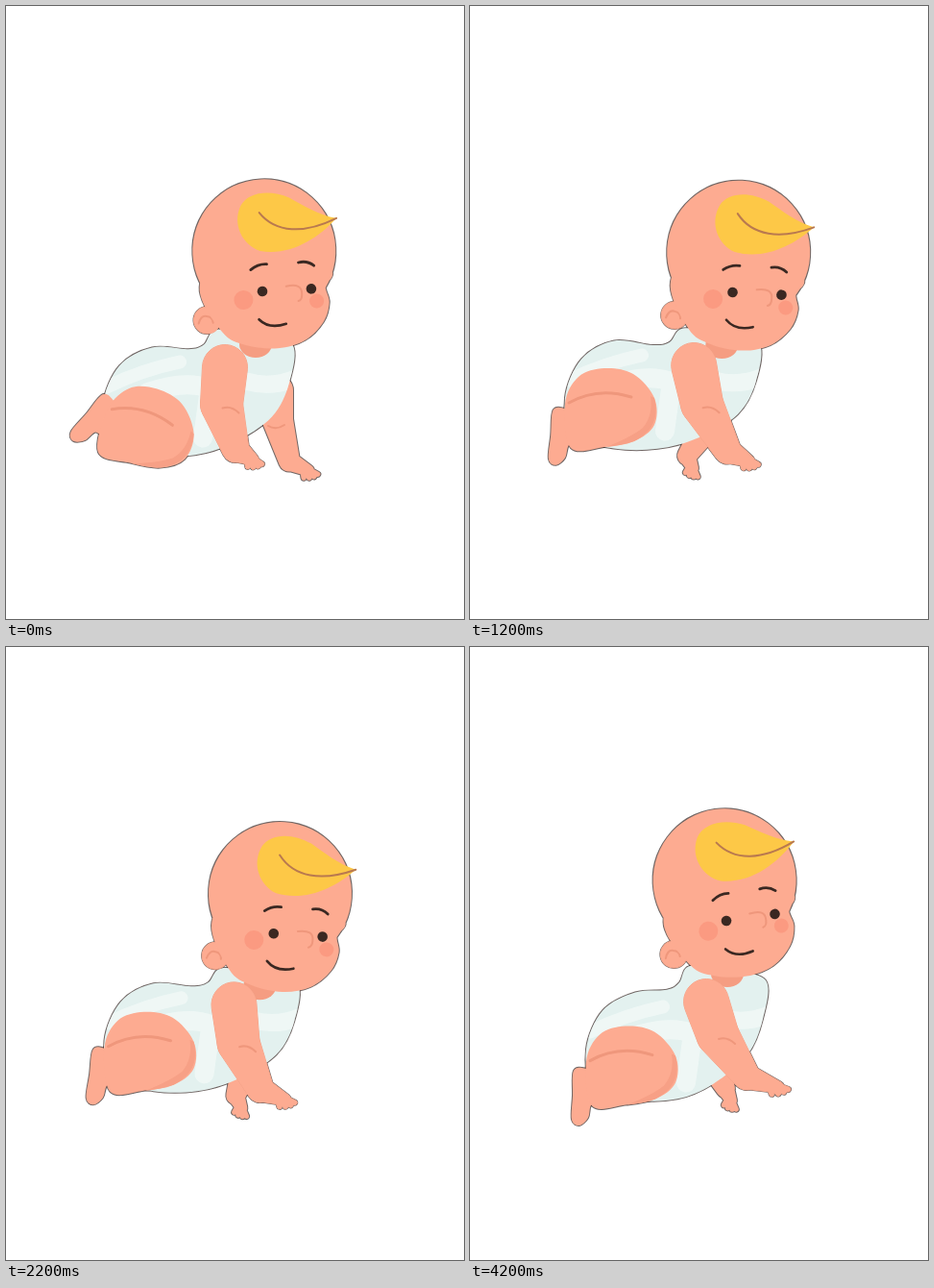
An HTML page with a canvas for the animation above (4800 ms loop, 477 by 638 pixels).

```html
<!DOCTYPE html>
<html lang="en">
<head>
<meta charset="utf-8">
<title>Crawling baby</title>
<style>
  html, body { margin: 0; width: 100%; height: 100%; overflow: hidden; background: #fff; }
  canvas { display: block; width: 477px; height: 638px; }
</style>
</head>
<body>
<canvas id="stage"></canvas>
<script>
const W = 477, H = 638, LOOP = 4800, LAST = 4200;
const SKIN = '#fdab91', SHADE = '#ef977c', DARK = '#3a2822', EDGE = '#241511';

const stage = document.getElementById('stage');
const dpr = window.devicePixelRatio || 1;
stage.width = W * dpr;
stage.height = H * dpr;
const g = stage.getContext('2d');

// the picture holds between these times
const TICKS = Array.from({ length: 10 }, (_, i) => i * 200)
  .concat(2200, 2400, 2600, 3000, 3400, LAST);

// time, head turn, head x y, hip slide, near wrist x; the rest of the rig follows from these
const KEYS = [
  [0, -3, 267, 297, -3, 239],
  [800, -11.5, 255, 285, 11, 271],
  [1200, 3, 273.5, 298, -5, 268],
  [1400, 7, 291, 305, -6, 267],
  [1800, 5, 281, 300, -2, 266],
  [2600, 0, 272, 293, 0, 261],
  [3400, -6.5, 271, 291, 14, 277],
  [LAST, -8, 267, 285, 17, 288]
];

// x, y, share of chest motion
const SUIT = [[222, 335, 1], [209, 350, .8], [193, 354, .5], [155, 351, 0], [121, 370, 0],
  [104, 410, 0], [112, 450, 0], [155, 463, 0], [200, 463, .1], [240, 451, .4],
  [280, 425, .8], [298, 390, 1], [301, 350, 1], [262, 340, 1]];

// closed smooth curve through the points
function blob(pts) {
  const p = new Path2D(), n = pts.length, at = i => pts[(i + n) % n];
  p.moveTo(pts[0][0], pts[0][1]);
  for (let i = 0; i < n; i++) {
    const [a, b, c, d] = [at(i - 1), at(i), at(i + 1), at(i + 2)];
    p.bezierCurveTo(b[0] + (c[0] - a[0]) / 6, b[1] + (c[1] - a[1]) / 6,
      c[0] - (d[0] - b[0]) / 6, c[1] - (d[1] - b[1]) / 6, c[0], c[1]);
  }
  p.closePath();
  return p;
}

function oval(x, y, rx, ry = rx) {
  const p = new Path2D();
  p.ellipse(x, y, rx, ry, 0, 0, Math.PI * 2);
  return p;
}

// tapered capsule
function limb(p, x1, y1, r1, x2, y2, r2) {
  const a = Math.atan2(y2 - y1, x2 - x1);
  const o = Math.acos((r1 - r2) / Math.max(Math.hypot(x2 - x1, y2 - y1), Math.abs(r1 - r2)));
  p.moveTo(x1 + r1 * Math.cos(a + o), y1 + r1 * Math.sin(a + o));
  p.arc(x1, y1, r1, a + o, a - o);
  p.arc(x2, y2, r2, a - o, a + o);
  p.closePath();
}

function hand(p, x, y, r, dx, dy) {
  limb(p, x, y, r, x + dx, y + dy, 6);
  const a = Math.atan2(dy, dx);
  for (let i = 0; i < 4; i++) {
    const bx = x + dx * (.75 + i * .09), by = y + dy * (.75 + i * .09), f = a + 1.1 - i * .4;
    limb(p, bx, by, 4, bx + 10 * Math.cos(f), by + 10 * Math.sin(f), 2.6);
  }
}

function arm(x1, y1, r1, x2, y2, r2, x3, y3, r3, dx, dy) {
  const p = new Path2D();
  limb(p, x1, y1, r1, x2, y2, r2);
  limb(p, x2, y2, r2, x3, y3, r3);
  hand(p, x3, y3, r3 - 1, dx, dy);
  return p;
}

const shift = ([px, py], dx, dy, deg) =>
  new DOMMatrix().translate(px + dx, py + dy).rotate(deg).translate(-px, -py);

function moved(path, m) {
  const p = new Path2D();
  p.addPath(path, m);
  return p;
}

function fill(path, color) {
  g.fillStyle = color;
  g.fill(path);
}

function line(path, color, width) {
  g.strokeStyle = color;
  g.lineWidth = width;
  g.stroke(typeof path === 'string' ? new Path2D(path) : path);
}

function skin(path) {
  line(path, '#f3a287', 1);
  fill(path, SKIN);
}

const thighBase = blob([[104, 418], [118, 390], [145, 381], [175, 387], [197, 412],
  [197, 440], [176, 457], [145, 463], [110, 464]]);
const footBase = blob([[91, 429], [104, 427], [120, 436], [118, 461], [109, 465],
  [106, 478], [97, 486], [89, 480], [90, 455]]);
const headBase = oval(276, 251, 74.5);
headBase.addPath(blob([[346, 276], [338, 291], [341, 308], [334, 328], [314, 346],
  [285, 353], [252, 348], [228, 333], [207, 285], [240, 240], [330, 240]]));
const earBase = oval(213, 320, 14);
const hair = new Path2D('M353 221C335 217 318 205 305 197C285 187 262 189 254 203' +
  'C244 222 254 244 272 251C302 258 332 242 353 221Z');
const thighShade = new Path2D('M197 412C202 432 196 447 176 457Q160 462 147 463' +
  'Q174 452 185 443Q196 430 193 410Z');
const thighCrease = new Path2D('M108 417Q138 400 173 411');

// drivers at time t; each move starts slowly and arrives fast
function drivers(t) {
  const i = KEYS.findLastIndex(k => k[0] <= t);
  const a = KEYS[i], b = KEYS[i + 1] || a;
  const k = b === a ? 0 : ((t - a[0]) / (b[0] - a[0])) ** 2;
  return a.map((v, j) => v + (b[j] - v) * k).slice(1);
}

function drawSuit(path, cx, cy, hx, hy) {
  fill(path, '#e3f1ef');
  g.save();
  g.clip(path);
  g.globalAlpha = .55;
  g.translate(hx, hy);
  line('M108 392Q145 374 184 366', '#fafdfc', 14);
  line('M150 398Q190 384 215 394L208 445', '#fafdfc', 20);
  g.translate(cx - hx, cy - hy);
  line('M255 389Q280 396 306 385', '#fafdfc', 18);
  g.restore();
}

function drawHead(m) {
  g.save();
  g.transform(m.a, m.b, m.c, m.d, m.e, m.f);
  skin(earBase);
  line('M204 323Q207 314 213 316Q219 317 219 323', SHADE, 2);
  fill(headBase, SKIN);
  fill(hair, '#fdc847');
  line('M273 211C289 233 318 236 353 221', '#b9794f', 2);
  fill(oval(252, 301, 10), '#fb9a81');
  fill(oval(328, 306, 7.5), '#fb9a81');
  fill(oval(272, 293, 5.3), DARK);
  fill(oval(323, 293, 5.3), DARK);
  line('M261 270Q269 264 278 265', DARK, 2.8);
  line('M311 265Q320 263 327 269', DARK, 2.8);
  line('M297 289Q314 286 313 298Q313 304 309 305', SHADE, 2);
  line('M267 322Q277 333 295 328', DARK, 2.6);
  g.restore();
}

function draw(t) {
  const [turn, headX, headY, slide, wristX] = drivers(t);
  const drift = t / LAST;
  const kick = 1 - Math.min(1, t / 800) ** 2;
  const lift = t > 1000 && t < 2600 ? Math.sin((t - 1000) / 1600 * Math.PI) : 0;

  const cx = 10 * drift - 3, cy = 2 - 5 * drift;
  const hx = slide, hy = .5 * slide + 6 * kick;
  const suit = blob(SUIT.map(([x, y, w]) => [x + hx + (cx - hx) * w, y + hy + (cy - hy) * w]));

  const thighAt = shift([150, 425], slide, .8 * slide + 19 * kick, 20 * kick);
  const footAt = shift([104, 440], slide + 3 * kick,
    .7 * slide - 17 * kick - 11 * lift, 38 * kick + 8 * lift);
  const headAt = shift([272, 293], headX - 272, headY - 293, turn);
  const thigh = moved(thighBase, thighAt), foot = moved(footBase, footAt);
  const head = moved(headBase, headAt), ear = moved(earBase, headAt);

  // near arm bends back a little at the elbow
  const sx = 228 + 18 * drift, sy = 376 - 7 * drift, wristY = 459 - .7 * slide;
  const ex = (sx + wristX) / 2 - 9, ey = (sy + wristY) / 2 - 4;
  const near = arm(sx, sy, 23.5, ex, ey, 22, wristX, wristY, 14, 18 + 15 * drift, 11);

  // far arm bears weight first, then sweeps forward under the belly
  const planted = t <= 1000;
  const farX = planted ? 283 : 252;
  const far = planted
    ? arm(farX, 400, 16, farX, 431, 16, 295, 470 - 1.2 * slide, 11, 20, 10)
    : arm(farX, 400, 16, farX, 430, 16, 226 + 40 * (t - 1200) / 3000, 466 - .4 * slide, 10, 6, 13);

  g.setTransform(dpr, 0, 0, dpr, 0, 0);
  g.fillStyle = '#fff';
  g.fillRect(0, 0, W, H);
  g.lineCap = g.lineJoin = 'round';

  // outer contour, left visible only around the whole figure
  g.globalAlpha = .65;
  for (const p of [far, suit, thigh, foot, near, ear, head]) line(p, EDGE, 2);
  g.globalAlpha = 1;

  fill(far, SKIN);
  line(`M${farX - 10} 437q8 5 17 -1`, SHADE, 2);
  drawSuit(suit, cx, cy, hx, hy);

  fill(foot, SKIN);
  fill(thigh, SKIN);
  fill(moved(thighShade, thighAt), '#f7a086');
  line(moved(thighCrease, thighAt), SHADE, 3);

  fill(oval(260 + 8 * drift, headY + 55, 17, 14), '#f59d82');
  skin(near);
  line(`M${ex + 1} ${ey + 4}q9 -3 17 5`, SHADE, 2);
  drawHead(headAt);
}

const start = performance.now();
function tick() {
  const now = (performance.now() - start) % LOOP;
  draw(TICKS.findLast(t => t <= now));
  requestAnimationFrame(tick);
}
tick();
</script>
</body>
</html>
```
